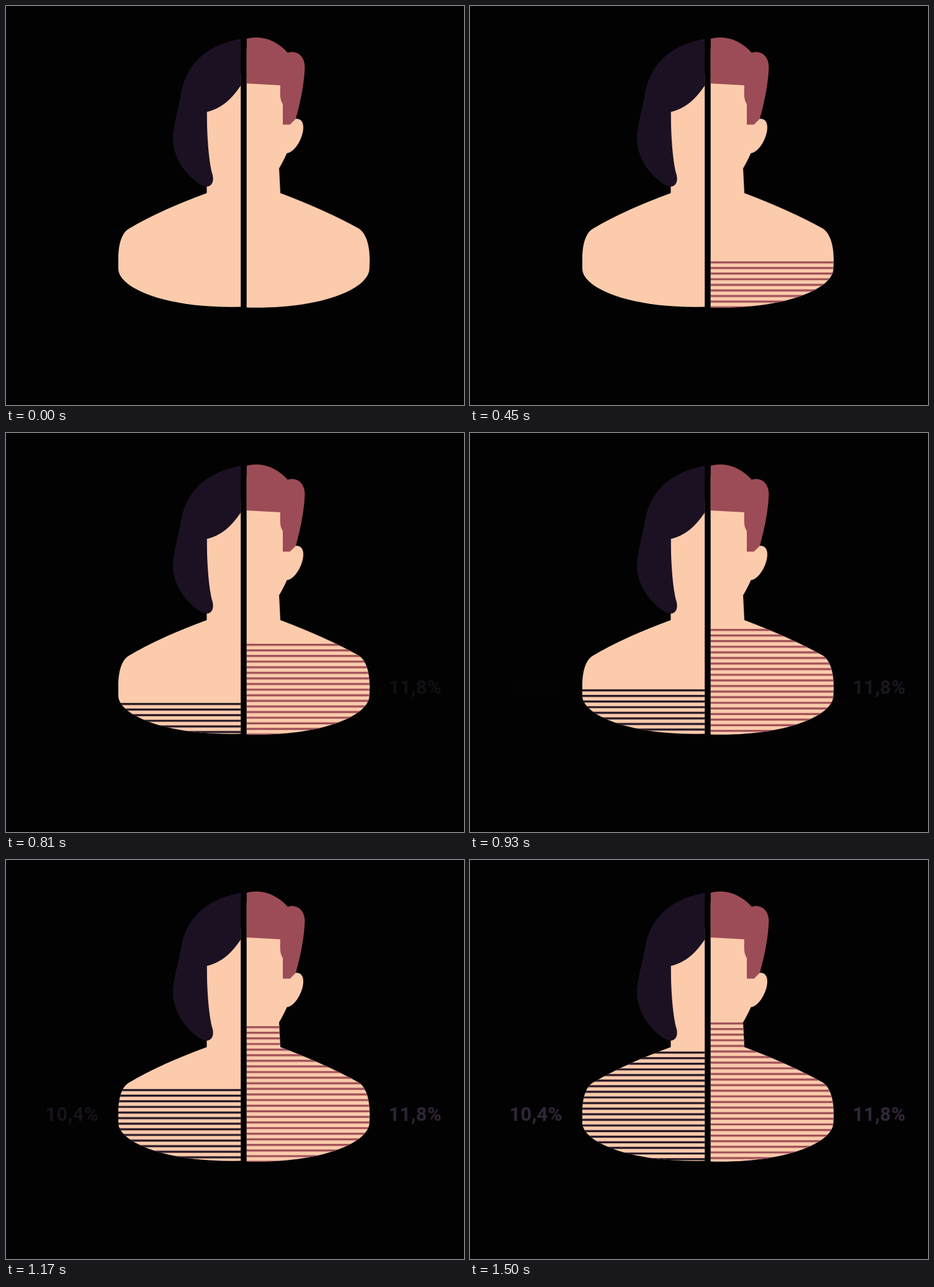
An HTML page for the animation above (2.7 s loop, 738 px wide and 644 px high).

```html
<!DOCTYPE html>
<html lang="en">
<head>
<meta charset="utf-8">
<title>Share by gender</title>
<style>
  html, body {
    margin: 0;
    width: 100%;
    height: 100%;
    overflow: hidden;
    background: #020202;
  }
  svg { display: block; width: 100%; height: 100%; }

  .skin { fill: #fccbab; }
  .dark { fill: #1c1122; }
  .red { fill: #9c4c56; }
  .edge { stroke: #150e1c; stroke-width: 2; paint-order: stroke; }

  .stripes {
    fill: none;
    stroke-width: 200;
    stroke-dasharray: 3.2 5.85;
    animation: 2.7s infinite;
  }
  .women { stroke: #1c1122; animation-name: rise-women; }
  .men { stroke: #9c4c56; animation-name: rise-men; }

  text {
    font: 700 31px Roboto, Arial, sans-serif;
    letter-spacing: .3px;
    fill: #32263a;
    animation: 2.7s infinite;
  }
  .women-share { animation-name: show-women; }
  .men-share { animation-name: show-men; }

  /* one step every 30 ms */
  @keyframes rise-women {
    0% { transform: translateY(584.2px); animation-timing-function: steps(50); }
    55.55%, 100% { transform: translateY(309.2px); }
  }
  @keyframes rise-men {
    0% { transform: translateY(502.2px); animation-timing-function: steps(40); }
    44.44%, 100% { transform: translateY(262.2px); }
  }
  @keyframes show-women {
    0% { opacity: 0; animation-timing-function: step-end; }
    33.33% { opacity: 0; animation-timing-function: steps(20); }
    55.55%, 100% { opacity: 1; }
  }
  @keyframes show-men {
    0% { opacity: 0; animation-timing-function: step-end; }
    22.22% { opacity: 0; animation-timing-function: steps(20); }
    44.44%, 100% { opacity: 1; }
  }
</style>
</head>
<body>
<svg viewBox="0 0 738 644">
  <defs>
    <path id="woman" d="M378.5 110 L323.5 165 V302 Q245 331 197 360
      C185 368 181 388 181 408 V424 C181 455 258 489 378.5 485.5 Z"/>
    <path id="man" d="M387.5 69 L443 120 L460 183 L467 182
      C476 182 479 188 479 196 C479 212 466 236 452.5 237.5
      C449 246 444 255 440 262 L442 302 Q516 330 569 359.5
      C582 369 586 390 586 410 L585.5 424 C585 456 508 490 387.5 486.5 Z"/>
    <clipPath id="woman-clip"><use href="#woman"/></clipPath>
    <clipPath id="man-clip"><use href="#man"/></clipPath>
  </defs>

  <use href="#woman" class="skin"/>
  <g clip-path="url(#woman-clip)">
    <path class="stripes women" d="M279 0 V180"/>
  </g>
  <path class="dark" d="M378.5 53 C330 61 295 88 284 132 C278 165 269 195 269 214
    C269 240 285 270 313 288 C316 290 320 291.5 324 291.5
    C331 291 335.5 284 333 273 C327 253 324 215 323.5 171
    C345 166 362 153 378.5 128 Z"/>

  <use href="#man" class="skin edge"/>
  <g clip-path="url(#man-clip)">
    <path class="stripes men" d="M487 0 V226"/>
  </g>
  <path class="red" d="M387.8 53 C412 46 437 56 454 75.5 C468 71 481 80 481.5 98
    C481 120 476 150 467 182 L457.5 191.5 H446 V158
    C441.5 151 441.5 145 442 128 L387.8 125 Z"/>
  <rect x="378.5" y="48" width="9" height="444" fill="#020202"/>

  <text class="women-share" x="63.5" y="421">10,4%</text>
  <text class="men-share" x="616.5" y="421">11,8%</text>
</svg>
</body>
</html>
```
